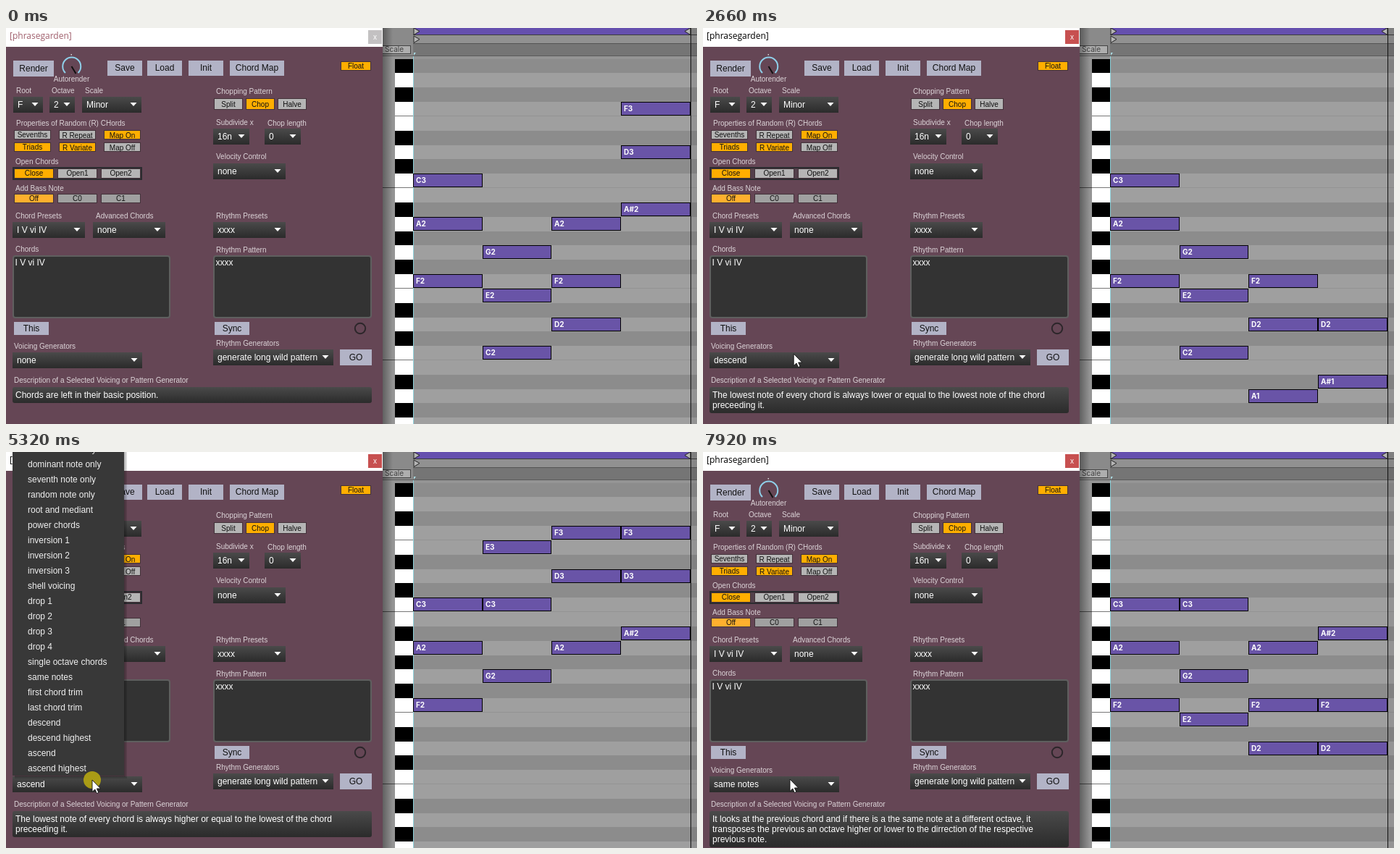
An HTML page that plays this animation: 954 by 547 pixels, repeating every 8 s.

```html
<!DOCTYPE html>
<html lang="en">
<head>
<meta charset="utf-8">
<title>Chord voicing demo</title>
<style>
html, body { margin: 0; width: 100%; height: 100%; overflow: hidden; background: #8e8e8e; }
svg { display: block; width: 954px; height: 547px; font-family: "Liberation Sans", Arial, sans-serif; }
text { white-space: pre; }
.title { font-family: "Open Sans", "Noto Sans", sans-serif; }
.note { font-family: Inter, sans-serif; font-weight: 700; }
</style>
</head>
<body>
<svg id="stage" viewBox="0 0 954 547">
  <defs>
    <linearGradient id="dark" x1="0" y1="0" x2="0" y2="1">
      <stop offset="0" stop-color="#4a4a4a"/><stop offset="1" stop-color="#2b2b2b"/>
    </linearGradient>
    <linearGradient id="shade">
      <stop offset="0" stop-opacity=".35"/><stop offset="1" stop-opacity="0"/>
    </linearGradient>
  </defs>
</svg>
<script>
const LOOP = 8000;
const ORANGE = '#ffae00', GREY = '#b5b5b5', BUTTON = '#b2b3c6', LABEL = '#dcd4d8';
const stage = document.getElementById('stage');

function el(parent, tag, attrs) {
  const node = document.createElementNS('http://www.w3.org/2000/svg', tag);
  for (const key in attrs) node.setAttribute(key, attrs[key]);
  parent.appendChild(node);
  return node;
}
const group = (parent = stage) => el(parent, 'g', {});
const rect = (g, x0, y0, x1, y1, fill, more) =>
  el(g, 'rect', { x: x0, y: y0, width: x1 - x0, height: y1 - y0, fill, ...more });
const path = (g, d, more) => el(g, 'path', { d, ...more });

// Text is placed by its left or middle point and the centre of its capitals.
function text(g, x, cy, str, size = 12, fill = '#fff', more = {}) {
  const node = el(g, 'text', { x, y: Math.floor(cy + size * 0.36), 'font-size': size, fill, ...more });
  node.textContent = str;
  return node;
}
const centred = (g, x, cy, str, size, fill) =>
  text(g, x, cy, str, size, fill, { 'text-anchor': 'middle' });
const label = (x, cy, str) => text(panel, x, cy, str, 10, LABEL);

function button(x0, y0, x1, y1, str) {
  rect(panel, x0, y0, x1, y1, BUTTON);
  centred(panel, (x0 + x1) / 2, (y0 + y1) / 2, str, 12, '#111');
}
function toggle(x0, y0, x1, y1, str, fill = GREY, drop = 0) {
  rect(panel, x0 + .5, y0 + .5, x1 - .5, y1 - .5, fill, { stroke: '#43323a' });
  centred(panel, (x0 + x1) / 2, (y0 + y1) / 2 + drop, str, 10, '#111');
}
function dropdown(x0, y0, x1, str) {
  rect(panel, x0, y0, x1, y0 + 22, 'url(#dark)');
  path(panel, `M${x1 - 15.5} ${y0 + 8}h9l-4.5 5z`, { fill: '#fff' });
  return text(panel, x0 + 6, y0 + 11, str);
}
function textBox(x0, y0, x1, y1, str) {
  rect(panel, x0 + 1, y0 + 1, x1 - 1, y1 - 1, '#333', { rx: 3, stroke: '#5f5f5f', 'stroke-width': 2 });
  text(panel, x0 + 3.5, y0 + 10, str);
}

// Piano roll: pitch 0 is C3.
const ROW = 19.83, BEAT = 95.7;
const NAMES = ['C', 'C#', 'D', 'D#', 'E', 'F', 'F#', 'G', 'G#', 'A', 'A#', 'B'];
const tone = p => (p + 48) % 12;
const rowTop = p => Math.round(201.2 - p * ROW);
const beatX = i => Math.round(562 + i * BEAT);

const roll = group();
rect(roll, 520, 0, 954, 547, '#949494');
for (let p = -18; p <= 8; p++) {
  const name = NAMES[tone(p)], sharp = name.length > 1;
  const y = rowTop(p), end = rowTop(p - 1);
  rect(roll, 562, y, 954, end, sharp ? '#8c8c8c' : '#9f9f9f');
  rect(roll, 537, y, 562, end, sharp ? '#000' : '#fff');
  if (name === 'C' || name === 'F') {
    rect(roll, 537, end - 1, 562, end, '#777');
    rect(roll, 562, end - 1, 954, end, '#939393');
  }
  if (name === 'C') rect(roll, 520, end - 1, 537, end, '#444');
}
rect(roll, 520, 0, 954, 39, '#8a8a8a');
rect(roll, 562, 10, 954, 22, '#919191');
rect(roll, 562, 21, 954, 22, '#555');
rect(roll, 562, 22, 954, 38, '#757575');
rect(roll, 520, 38, 954, 39, '#5a5a5a');
rect(roll, 563, 0, 945, 10, '#654fae');
rect(roll, 562, 9, 954, 10, '#3c3c3c');
for (const d of ['M563 0l8 4.5-8 5z', 'M945 0l-8 4.5 8 5z', 'M563 11l8 4.5-8 5z'])
  path(roll, d, { fill: '#b4b4b4', stroke: '#222' });
rect(roll, 515.5, 24.5, 558.5, 35.5, '#aeaeae', { stroke: '#444' });
text(roll, 523, 30, 'Scale', 10, '#444', { 'font-family': 'Inter, sans-serif' });
rect(roll, 562, 39, 563, 547, '#8ed3dc');
path(roll, 'M563 34h3l-3 4z', { fill: '#a9dbe2' });
rect(roll, 946, 0, 954, 547, '#000', { opacity: .08 });
rect(roll, 945, 0, 946, 547, '#111');
rect(roll, 520, 0, 534, 547, 'url(#shade)');

const TONIC = [-7, -3, 0];
const VOICINGS = [
  [TONIC, [-12, -8, -5], [-10, -7, -3], [-2, 2, 5]],
  [TONIC, [-12, -8, -5], [-15, -10, -7], [-19, -14, -10]],
  [TONIC, [-5, 0, 4], [-3, 2, 5], [-2, 2, 5]],
  [TONIC, [-8, -5, 0], [-10, -7, -3], [-10, -7, -2]]
];
const noteSets = VOICINGS.map(chords => {
  const g = group();
  chords.forEach((chord, i) => chord.forEach(p => {
    const x = beatX(i), y = rowTop(p);
    rect(g, x + .5, y + .5, beatX(i + 1) - .5, y + 18.5, '#6954a7', { stroke: '#000' });
    text(g, x + 4, y + 9.5, NAMES[tone(p)] + (3 + Math.floor(p / 12)), 10, '#fff', { class: 'note' });
  }));
  return g;
});

// Plug-in window
const panel = group();
rect(panel, 0, 0, 520, 26, '#fff');
rect(panel, 0, 26, 520, 547, '#654655');
const title = text(panel, 5, 11.5, '[phrasegarden]', 12, '#000', { class: 'title' });
const closeBox = rect(panel, 500, 3, 519, 22, '#c75050');
centred(panel, 509.5, 12.5, 'x', 10, '#fff');

button(10, 45, 66, 67, 'Render');
button(140, 45, 188, 66, 'Save');
button(195, 45, 243, 66, 'Load');
button(252, 45, 300, 66, 'Init');
button(309, 45, 384, 66, 'Chord Map');
toggle(462, 46, 504, 59, 'Float', ORANGE);
path(panel, 'M82 62A12.5 12.5 0 1 1 99.5 62', { fill: 'none', stroke: '#8fd0ea', 'stroke-width': 2 });
path(panel, 'M90.5 53l6 10', { stroke: '#111', 'stroke-width': 2 });
rect(panel, 89.5, 36, 91, 37.5, '#ddd');
centred(panel, 90.5, 71, 'Autorender', 10, LABEL);

label(14, 87, 'Root'); label(63, 87, 'Octave'); label(109, 87, 'Scale');
dropdown(10, 95, 51, 'F'); dropdown(60, 95, 95, '2'); dropdown(105, 95, 187, 'Minor');

label(14, 132, 'Properties of Random (R) CHords');
[['Sevenths', 'Triads'], ['R Repeat', 'R Variate'], ['Map On', 'Map Off']].forEach((pair, col) =>
  pair.forEach((s, row) => {
    const x = 11 + col * 62, y = 141 + row * 17;
    const on = col < 2 ? row === 1 : row === 0;
    toggle(x, y, x + 51, y + 13, s, on ? ORANGE : GREY, col ? 1 : 0);
  }));

label(13, 185, 'Open Chords');
rect(panel, 10, 193, 187, 209, '#54404b', { stroke: '#2c2c30', 'stroke-width': 2 });
['Close', 'Open1', 'Open2'].forEach((s, i) =>
  toggle(11 + i * 60, 194, 66 + i * 60, 208, s, i ? GREY : ORANGE));
label(13, 222, 'Add Bass Note');
['Off', 'C0', 'C1'].forEach((s, i) =>
  toggle(11 + i * 60, 229, 66 + i * 60, 242, s, i ? '#a0a0a0' : '#ffb02e'));

label(13, 260, 'Chord Presets'); label(124, 260, 'Advanced Chords');
dropdown(9, 268, 109, 'I V vi IV'); dropdown(120, 268, 220, 'none');
label(13, 306, 'Chords');
textBox(9, 314, 227, 401, 'I V vi IV');
button(11, 406, 59, 424, 'This');
label(11, 440, 'Voicing Generators');
const picked = dropdown(9, 448, 188, 'none');
label(11, 487, 'Description of a Selected Voicing or Pattern Generator');
const infoBox = rect(panel, 9, 496, 505, 518, 'url(#dark)', { rx: 3 });
const infoLines = [0, 1, 2].map(i => text(panel, 13, 507 + i * 14, ''));

label(290, 88, 'Chopping Pattern');
['Split', 'Chop', 'Halve'].forEach((s, i) =>
  toggle(287 + i * 44, 97, 327 + i * 44, 113, s, i === 1 ? ORANGE : GREY, 1));
label(290, 131, 'Subdivide x'); label(361, 132, 'Chop length');
dropdown(286, 139, 336, '16n'); dropdown(357, 139, 407, '0');
label(290, 178, 'Velocity Control');
dropdown(286, 187, 386, 'none');
label(290, 260, 'Rhythm Presets');
dropdown(286, 268, 386, 'xxxx');
label(290, 307, 'Rhythm Pattern');
textBox(286, 314, 505, 401, 'xxxx');
button(288, 406, 336, 424, 'Sync');
el(panel, 'circle', { cx: 489, cy: 415, r: 7.2, fill: 'none', stroke: '#2c262a', 'stroke-width': 2 });
label(290, 436, 'Rhythm Generators');
dropdown(286, 444, 452, 'generate long wild pattern');
button(461, 444, 505, 466, 'GO');

// Pop-up menu, listed from the bottom row upwards
const ITEMS = ['ascend highest', 'ascend', 'descend highest', 'descend', 'last chord trim',
  'first chord trim', 'same notes', 'single octave chords', 'drop 4', 'drop 3', 'drop 2', 'drop 1',
  'shell voicing', 'inversion 3', 'inversion 2', 'inversion 1', 'power chords', 'root and mediant',
  'random note only', 'seventh note only', 'dominant note only', 'mediant note only'];
const menu = group();
for (const spread of [4, 2]) rect(menu, 12, 0, 163 + spread, 447 + spread, '#000', { opacity: .15 });
rect(menu, 9, 0, 163, 447, '#383838');
const hover = rect(menu, 10, 0, 162, 20, '#494949');
ITEMS.forEach((s, i) => text(menu, 30, 437 - i * 21, s, 12, '#f0f0f0'));

// Pointer
const pointer = group();
const press = el(pointer, 'circle', { r: 12, fill: '#b3a412', opacity: .92 });
const arrow = path(pointer, 'M0 0V16.5L3.8 13 6.3 18.6 8.9 17.4 6.4 12H11.6Z',
  { fill: '#fff', stroke: '#111', 'stroke-width': .9 });
const lens = group(pointer);
for (const [stroke, width] of [['#222', 3.4], ['#fff', 1.7]]) {
  path(lens, 'M4.5 4.5L8.5 8.5', { stroke, 'stroke-width': width });
  el(lens, 'circle', { cx: .5, cy: .5, r: 6, fill: 'none', stroke, 'stroke-width': width });
}
el(lens, 'circle', { cx: .5, cy: .5, r: 3, fill: 'none', stroke: '#fff', 'stroke-width': 1 });

const LOWEST = 'The lowest note of every chord is always ';
const PICKS = [
  [0, 'none', 'Chords are left in their basic position.'],
  [1890, 'descend', LOWEST + 'lower or equal to the lowest note of the chord\npreceeding it.'],
  [4330, 'ascend', LOWEST + 'higher or equal to the lowest of the chord\npreceeding it.'],
  [7010, 'same notes', 'It looks at the previous chord and if there is a the same note at a different octave, it\n' +
    'transposes the previous an octave higher or lower to the dirrection of the respective\nprevious note.']
];
const NOTE_TIMES = [0, 2030, 4440, 7150];
const MENU_OPEN = [[960, 1890], [3020, 4330], [5320, 7010]];
const PRESSED = [[900, 1270], [1780, 2000], [2940, 3160], [4220, 4480], [5250, 5460], [6930, 7150]];
// time, x, y of the pointer tip
const TRACK = [
  [70, 737, 540], [830, 152, 464], [1260, 152, 464], [1680, 72, 374], [2000, 72, 374],
  [2450, 128, 451], [2590, 126, 450], [2800, 123, 450], [3020, 123, 450], [3430, 118, 446],
  [3740, 118, 446], [4130, 72, 416], [4430, 72, 416], [4680, 116, 450], [5180, 119, 453],
  [5460, 119, 453], [5800, 118, 444], [6120, 118, 444], [6800, 72, 313], [7150, 72, 313],
  [7650, 122, 453], [7900, 120, 452], [8000, 120, 452]
];

const within = (spans, t) => spans.some(([a, b]) => t >= a && t < b);
const latest = (times, t) => times.filter(s => s <= t).length - 1;
const show = (node, on) => node.setAttribute('display', on ? 'inline' : 'none');

function pointerAt(t) {
  const i = Math.max(0, Math.min(latest(TRACK.map(k => k[0]), t), TRACK.length - 2));
  const [t0, x0, y0] = TRACK[i], [t1, x1, y1] = TRACK[i + 1];
  const u = Math.max(0, Math.min(1, (t - t0) / (t1 - t0)));
  const e = u * u * (3 - 2 * u);
  return [x0 + (x1 - x0) * e, y0 + (y1 - y0) * e];
}

function draw(t) {
  const active = t >= 900;
  title.setAttribute('fill', active ? '#000' : '#a0606d');
  closeBox.setAttribute('fill', active ? '#c75050' : '#c3c1c2');

  const [, name, info] = PICKS[latest(PICKS.map(p => p[0]), t)];
  const lines = info.split('\n');
  picked.textContent = name;
  infoLines.forEach((node, i) => { node.textContent = lines[i] || ''; });
  infoBox.setAttribute('height', 8 + lines.length * 14);

  const voicing = latest(NOTE_TIMES, t);
  noteSets.forEach((g, i) => show(g, i === voicing));

  const [x, y] = pointerAt(t);
  const row = Math.floor((447 - y) / 21);
  show(menu, within(MENU_OPEN, t));
  show(hover, row >= 0);
  hover.setAttribute('y', 427 - row * 21);

  const zoom = t >= 900 && t < 1270;
  show(pointer, t >= 70);
  show(press, within(PRESSED, t));
  show(lens, zoom);
  show(arrow, !zoom);
  pointer.setAttribute('transform', `translate(${x.toFixed(1)} ${y.toFixed(1)})`);
}

const start = performance.now();
function tick() {
  draw((performance.now() - start) % LOOP);
  requestAnimationFrame(tick);
}
draw(0);
requestAnimationFrame(tick);
</script>
</body>
</html>
```
